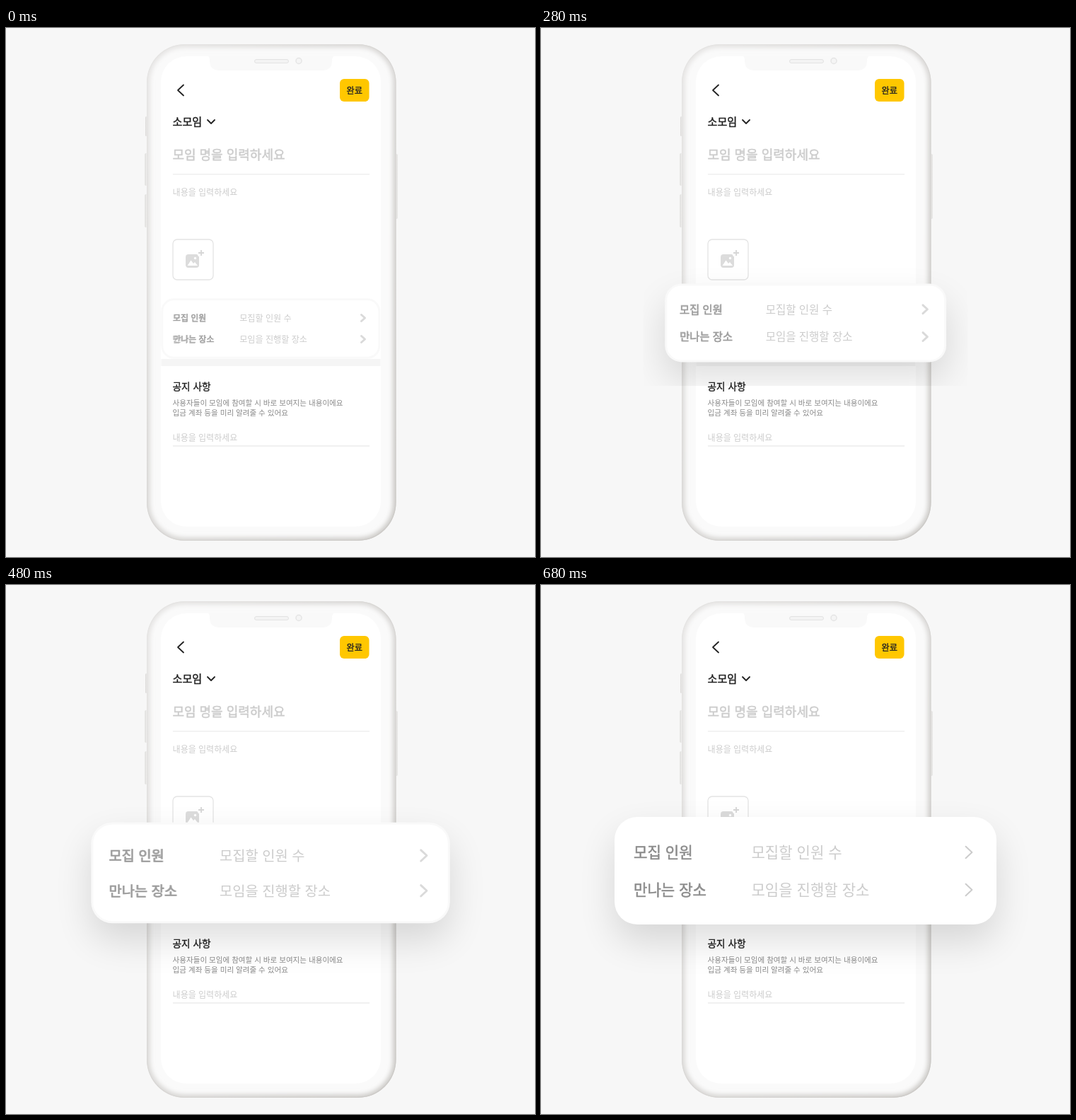
An HTML page for the animation above (1480 ms loop, 748x748 px).

```html
<!DOCTYPE html>
<html lang="ko">
<head>
<meta charset="utf-8">
<style>
  html, body { margin: 0; height: 100%; overflow: hidden; background: #f7f7f7; }
  svg { display: block; width: 100vw; height: 100vh; }
  text { font-family: "Noto Sans CJK KR", "Noto Sans CJK", "Noto Sans KR", sans-serif; white-space: pre; }
  .line { fill: none; stroke-linecap: round; stroke-linejoin: round; }
</style>
</head>
<body>
<svg id="stage" viewBox="0 0 748 748">
  <defs>
    <linearGradient id="edge" x1="0" y1="0" x2="1" y2="1">
      <stop offset="0" stop-color="#e6e5e4"/>
      <stop offset="1" stop-color="#cbc9c6"/>
    </linearGradient>
    <linearGradient id="key">
      <stop offset="0" stop-color="#d6d5d3"/>
      <stop offset=".5" stop-color="#efeeed"/>
      <stop offset="1" stop-color="#d9d8d6"/>
    </linearGradient>
    <filter id="soft"><feGaussianBlur stdDeviation="3"/></filter>
    <filter id="blur" filterUnits="userSpaceOnUse" x="0" y="200" width="748" height="500">
      <feGaussianBlur stdDeviation="26"/>
    </filter>
    <clipPath id="body"><rect x="199" y="23" width="352.500" height="702" rx="54"/></clipPath>
    <clipPath id="reach"><rect id="reachBox"/></clipPath>
  </defs>

  <!-- phone -->
  <g fill="url(#key)">
    <rect x="197" y="125" width="4" height="28" rx="1.500"/>
    <rect x="196.500" y="177" width="4" height="46" rx="1.500"/>
    <rect x="196.500" y="235" width="4" height="47" rx="1.500"/>
    <rect x="549.500" y="178" width="4" height="92" rx="1.500"/>
  </g>
  <g clip-path="url(#body)">
    <rect x="199" y="23" width="352.500" height="702" fill="#fafafa"/>
    <rect x="199" y="23" width="352.500" height="702" rx="54" fill="none" stroke="url(#edge)" stroke-width="9" filter="url(#soft)"/>
    <rect x="199" y="23" width="352.500" height="702" rx="54" fill="none" stroke="url(#edge)" stroke-width="2.500"/>
  </g>
  <rect x="219" y="40" width="311" height="665" rx="36" fill="#fff"/>
  <path d="M286 40H464Q461 41 461 46Q461 60 447 60H302Q288 60 288 46Q288 41 286 40Z" fill="#f9f9f9"/>
  <rect x="351.500" y="44.500" width="48" height="5" rx="2.500" fill="#f3f3f3" stroke="#e3e3e3"/>
  <circle cx="414" cy="46.500" r="4" fill="#f5f5f5" stroke="#e5e5e5" stroke-width="1.500"/>

  <!-- form -->
  <g class="line" stroke="#222" stroke-width="1.800">
    <path d="M251 80.500L243 88L251 95.500"/>
    <path d="M285 130L290 135L295 130"/>
  </g>
  <rect x="472" y="72" width="41.500" height="32" rx="6" fill="#ffc700"/>
  <path d="M236 206.800H514M236 591H514" stroke="#ebebeb" stroke-width="1.300"/>
  <rect x="236" y="299" width="57" height="57" rx="6" fill="#fff" stroke="#e4e4e4" stroke-width="1.300"/>
  <rect x="254" y="320" width="19" height="19" rx="4" fill="#dcdcdc"/>
  <path d="M256.500 336L261.500 328.500L265 333L267 331L271 336Z" fill="#fff"/>
  <circle cx="267.500" cy="325.500" r="1.700" fill="#fff"/>
  <circle cx="276" cy="318" r="6" fill="#fff"/>
  <path d="M276 314V322M272 318H280" stroke="#d6d6d6" stroke-width="1.800"/>
  <rect x="219.500" y="468" width="310" height="10" fill="#f5f5f5"/>
  <g id="form"></g>

  <!-- lifted card -->
  <g clip-path="url(#reach)"><rect id="shadow" filter="url(#blur)"/></g>
  <rect id="card" fill="#fff"/>
  <rect id="rim" fill="none" stroke="#000" stroke-width="3"/>
  <g id="rows"></g>
</svg>
<script>
const $ = id => document.getElementById(id);
const set = (el, attrs) => { for (const k in attrs) el.setAttribute(k, attrs[k]); };
const add = (parent, tag, attrs) => {
  const el = document.createElementNS("http://www.w3.org/2000/svg", tag);
  set(el, attrs);
  return parent.appendChild(el);
};
const mix = (a, b, p) => a + (b - a) * p;

// Text whose glyphs are centred on cy; weight is extra stem width in em
function place(el, x, cy, size, weight = 0) {
  set(el, { x, y: cy + size * .38, "font-size": size, "stroke-width": size * weight });
}
function label(parent, str, fill) {
  const el = add(parent, "text", { fill, stroke: fill });
  el.textContent = str;
  return el;
}

const MEDIUM = .028;
[
  ["완료", 481.5, 88.5, 12.2, "#222", MEDIUM],
  ["소모임", 235.6, 132, 15.1, "#222", MEDIUM],
  ["모임 명을 입력하세요", 235.4, 179, 18, "#ccc", MEDIUM],
  ["내용을 입력하세요", 235.6, 232.5, 12, "#ccc"],
  ["공지 사항", 235.6, 506.5, 13.6, "#222", MEDIUM],
  ["사용자들이 모임에 참여할 시 바로 보여지는 내용이에요", 235.6, 530, 10.55, "#888"],
  ["입금 계좌 등을 미리 알려줄 수 있어요", 235.6, 544, 10.55, "#888"],
  ["내용을 입력하세요", 235.6, 579.5, 12, "#ccc"]
].forEach(([str, x, y, size, fill, weight]) => place(label($("form"), str, fill), x, y, size, weight));

const rows = [
  ["모집 인원", "모집할 인원 수", 410, 378, 3.904],
  ["만나는 장소", "모임을 진행할 장소", 440, 431, 4.824]
].map(([name, hint, from, to, ems]) => {
  const g = $("rows");
  const ghost = label(g, name, "#8c8c8c");
  ghost.setAttribute("text-anchor", "end");
  return { from, to, ems, ghost, name: label(g, name, "#8c8c8c"), hint: label(g, hint, "#ccc"),
           arrow: add(g, "path", { class: "line" }) };
});

// cubic-bezier(.42, 0, .58, 1)
function ease(x) {
  if (x >= 1) return 1;
  let lo = 0, hi = 1, u;
  for (let i = 0; i < 24; i++) {
    u = (lo + hi) / 2;
    const v = 1 - u;
    if (1.26 * u * v * v + 1.74 * u * u * v + u ** 3 < x) lo = u; else hi = u;
  }
  return u * u * (3 - 2 * u);
}

function draw(ms) {
  const p = ease(ms / 650);
  const moving = p > 0 && p < .99;
  const x = mix(219.3, 104, p), y = mix(382.3, 328, p);
  const width = mix(529.2, 644, p) - x, height = mix(467.7, 480, p) - y;
  const rx = mix(18, 32, p);
  const size = mix(12.1, 21.1, p);

  set($("card"), { x, y, width, height, rx });
  set($("rim"), { x: x + 1.5, y: y + 1.5, width: width - 3, height: height - 3, rx: rx - 1.5,
                  opacity: moving ? .022 : 0 });
  set($("shadow"), { x, y: y + 24, width, height, rx, opacity: .13 * Math.min(1, p * 6) });
  const side = mix(209, 40, p);
  set($("reachBox"), { x: side, y: 250, width: 748 - 2 * side, height: mix(444, 606, p) - 250 });

  for (const r of rows) {
    const cy = mix(r.from, r.to, p);
    const left = mix(235.6, 131, p);
    place(r.name, left, cy, size, MEDIUM);
    place(r.ghost, left + r.ems * size, cy, size * (1 - .04 * (1 - p)), MEDIUM);
    set(r.name, { opacity: moving ? .65 : 1 });
    set(r.ghost, { opacity: moving ? .6 : 0 });
    place(r.hint, mix(330.2, 297.4, p), cy, size);

    const ax = mix(505, 605, p), w = mix(2.5, 4.4, p), h = mix(4.5, 8.2, p);
    set(r.arrow, {
      d: `M${ax - w} ${cy - h}L${ax + w} ${cy}L${ax - w} ${cy + h}`,
      stroke: moving ? "#dadada" : "#ccc",
      "stroke-width": mix(1.2, 2, p) + (moving ? 1.8 - .9 * p : 0)
    });
  }
}

const LOOP = 1480, STEP = 40;
let start;
function tick(now) {
  start ??= now;
  const ms = (now - start) % LOOP;
  draw(Math.min(680, Math.floor(ms / STEP) * STEP));
  requestAnimationFrame(tick);
}
draw(0);
requestAnimationFrame(tick);
</script>
</body>
</html>
```
